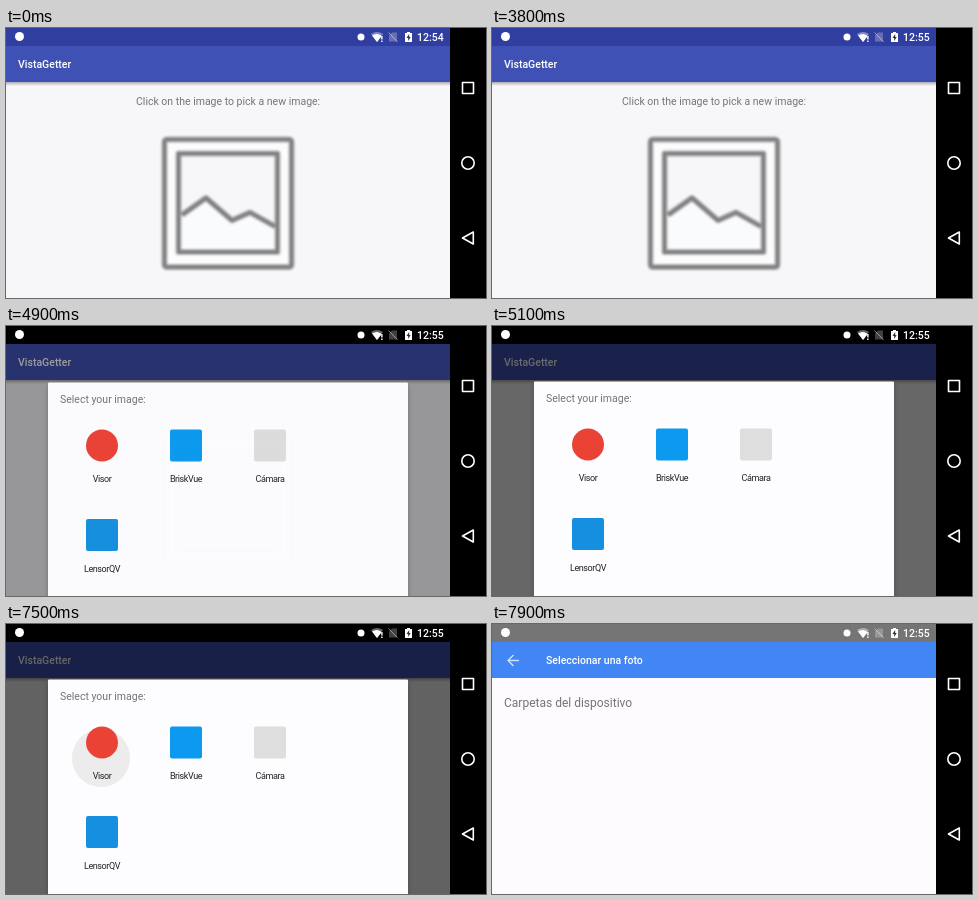
Write an HTML page that moves like this. It is 480 px wide and 270 px high and loops after 8000 ms.

```html
<!DOCTYPE html>
<html lang="en">
<head>
<meta charset="utf-8">
<title>Choosing a picture</title>
<style>
  html, body { margin: 0; width: 100%; height: 100%; overflow: hidden; background: #000; }
  svg { display: block; width: 100vw; height: 100vh; }
  text { font: 400 10.5px Roboto, sans-serif; fill: #757575; }
  .title { font-weight: 500; fill: #fff; }
  .label { font-size: 9px; letter-spacing: -.4px; text-anchor: middle; fill: #212121; }
  .folder { font-size: 12px; }

  .anim { animation: 8s step-end infinite; }
  .before { animation-name: before; }
  .after { animation-name: after; }
  .dim { animation-name: dim; }
  .cover { animation-name: cover; }
  .dialog { animation-name: dialog; }
  .ripple { animation-name: ripple; }
  .gallery { animation-name: gallery; }

  @keyframes before { 0% { opacity: 1 } 16.25%, 100% { opacity: 0 } }
  @keyframes after { 0% { opacity: 0 } 16.25%, 100% { opacity: 1 } }
  @keyframes dim {
    0% { opacity: 0 }
    60% { opacity: .17 }
    61.25% { opacity: .39 }
    62.5% { opacity: .53 }
    63.75% { opacity: .58 }
    65%, 100% { opacity: .6 }
  }
  @keyframes cover {
    0% { opacity: 0 }
    60% { opacity: .5 }
    61.25%, 100% { opacity: 1 }
  }
  @keyframes dialog {
    0% { opacity: 0; transform: translateY(21px) }
    60% { opacity: .51; transform: translateY(8px) }
    61.25% { opacity: .985; transform: translateY(1px) }
    62.5%, 100% { opacity: 1; transform: none }
  }
  @keyframes ripple {
    0% { opacity: 0; transform: scale(0) }
    93.75% { opacity: .6; transform: scale(.5) }
    95% { opacity: 1; transform: scale(.8) }
    96.25% { opacity: 1; transform: scale(1) }
    97.5%, 100% { opacity: 1; transform: scale(1.15) }
  }
  @keyframes gallery {
    0% { opacity: 0; transform: translateY(21px) }
    96.25% { opacity: .3; transform: translateY(17px) }
    97.5% { opacity: .85; transform: translateY(3px) }
    98.75%, 100% { opacity: 1; transform: none }
  }
</style>
</head>
<body>
<svg viewBox="0 0 480 270">
  <defs>
    <linearGradient id="shade" x2="0" y2="1">
      <stop stop-opacity=".3"/>
      <stop offset="1" stop-opacity="0"/>
    </linearGradient>
    <filter id="soft"><feGaussianBlur stdDeviation=".9"/></filter>
    <filter id="drop"><feGaussianBlur stdDeviation="2.5"/></filter>
    <clipPath id="screen"><path d="M0 0H444V270H0Z"/></clipPath>
    <clipPath id="cell"><path d="M42 88H166V179.500H42Z"/></clipPath>
    <g id="outline" fill="none" stroke-linejoin="round">
      <rect x="158.5" y="111.5" width="127" height="127.500" rx="2.500"/>
      <rect x="172.5" y="125.5" width="99" height="98.500"/>
      <path d="M176 187L200 170L226 192.500L244 184.500L269 198.500"/>
    </g>
  </defs>

  <g clip-path="url(#screen)">
    <!-- Start screen -->
    <rect width="444" height="270" fill="#f7f6f9"/>
    <rect y="54" width="444" height="4" fill="url(#shade)"/>
    <rect y="18" width="444" height="36" fill="#3f51b5"/>
    <rect width="444" height="18" fill="#303f9f"/>
    <text class="title" x="12" y="40">VistaGetter</text>
    <text x="130" y="77.3">Click on the image to pick a new image:</text>
    <g filter="url(#soft)">
      <path fill="#fcfcfd" fill-rule="evenodd" d="M158 111H286V240H158ZM173 126V225H271V126Z"/>
      <path fill="#fafbfc" d="M174 187L200 170L226 192L244 184L270 198V224H174Z"/>
      <use href="#outline" stroke="#a2a2a4" stroke-width="6"/>
      <use href="#outline" stroke="#7e7e80" stroke-width="3"/>
    </g>

    <rect class="anim dim" y="18" width="444" height="252"/>
    <rect class="anim cover" width="444" height="18"/>

    <!-- App chooser -->
    <g class="anim dialog">
      <rect x="42" y="58" width="360" height="240" opacity=".25" filter="url(#drop)"/>
      <rect x="42" y="55.500" width="360" height="240" rx="1" fill="#fdfcfe"/>
      <g clip-path="url(#cell)">
        <g transform="translate(95 134)"><circle class="anim ripple" r="58" fill="#e1e1e2"/></g>
      </g>
      <text x="54" y="76">Select your image:</text>
      <circle cx="96" cy="118.500" r="16" fill="#ea4335"/>
      <rect x="164" y="102.500" width="32" height="32" rx="2" fill="#0b9af0"/>
      <rect x="248" y="102.500" width="32" height="32" rx="2" fill="#dedede"/>
      <rect x="80" y="192" width="32" height="32" rx="2" fill="#1590e0"/>
      <text class="label" x="96" y="154.500">Visor</text>
      <text class="label" x="180" y="154.500">BriskVue</text>
      <text class="label" x="264" y="154.500">Cámara</text>
      <text class="label" x="96" y="245">LensorQV</text>
    </g>

    <!-- Photo gallery -->
    <g class="anim gallery">
      <rect width="444" height="300" fill="#fdfbfe"/>
      <rect width="444" height="18" fill="#757575"/>
      <rect y="18" width="444" height="36" fill="#4285f4"/>
      <path d="M27 36.500H16M21.500 31L16 36.500L21.500 42" fill="none" stroke="#fff" stroke-opacity=".75" stroke-width="1.400"/>
      <text class="title" x="54" y="40">Seleccionar una foto</text>
      <text class="folder" x="12" y="82.500">Carpetas del dispositivo</text>
    </g>
  </g>

  <!-- Status bar -->
  <g fill="#fff">
    <circle cx="13.500" cy="8.500" r="4.500"/>
    <circle cx="355" cy="9" r="3.500"/>
    <path opacity=".4" d="M365 6Q371 2 377 6L371 14Z"/>
    <path d="M366 7.500Q371 4.500 375 7.500V9L371 14Z"/>
    <path d="M375.200 8H376.600V11.500H375.200ZM375.200 12.500H376.600V14H375.200Z"/>
    <path opacity=".25" d="M386 4.500H391V13.500H383V7.500Z"/>
    <path opacity=".5" fill="none" stroke="#fff" d="M382.500 4.500L391.500 13.800"/>
    <path d="M399 5H401V4H404V5H406V14H399Z"/>
    <path fill="#303030" d="M403.200 6L400.500 10H402.200V13L404.700 9H403.200Z"/>
    <text class="title anim before" x="411" y="13">12:54</text>
    <text class="title anim after" x="411" y="13">12:55</text>
  </g>

  <!-- Navigation buttons -->
  <rect x="444" width="36" height="270"/>
  <g fill="none" stroke="#fff" stroke-width="1.600" stroke-linejoin="round">
    <rect x="456.500" y="54.500" width="11" height="11"/>
    <circle cx="462" cy="135" r="6.200"/>
    <path d="M467.300 204L456.500 210L467.300 216Z"/>
  </g>
</svg>
</body>
</html>
```
